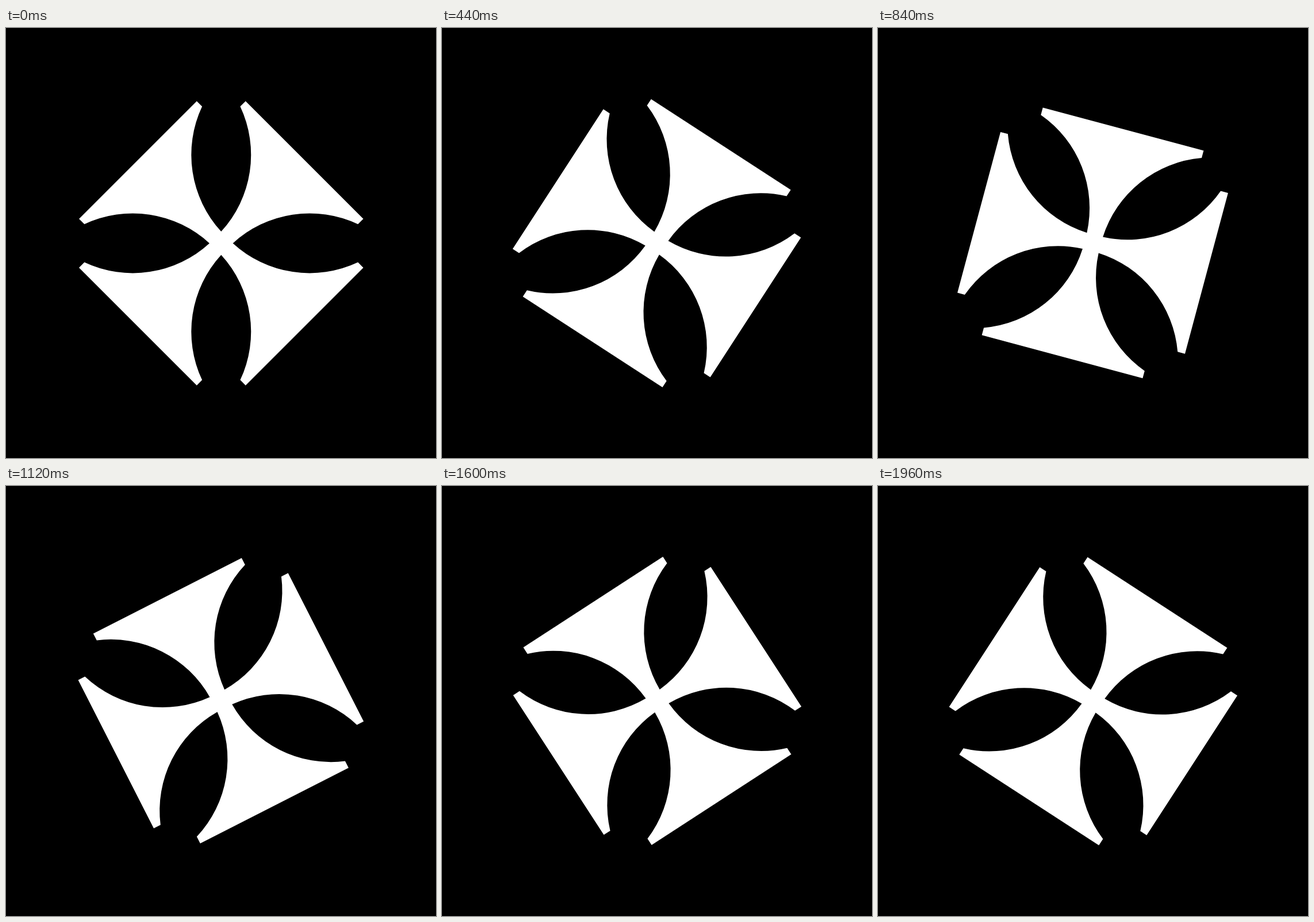
These frames come from a looping animation (748 px wide and 748 px high, 2000 ms). An HTML page with a canvas:

```html
<!DOCTYPE html>
<html lang="en">
<head>
<meta charset="utf-8">
<title>Spinning cross</title>
<style>
  html, body { margin: 0; width: 100%; height: 100%; overflow: hidden; background: #000; }
  canvas { display: block; }
</style>
</head>
<body>
<canvas id="stage" width="748" height="748"></canvas>
<script>
const SIZE = 748, LOOP = 2000, FRAME = 40;
const NECK = 14.4;    // half width where the arms meet
const HALF = 144.8;   // half length of an outer edge
const REACH = 204.9;  // centre to outer edge
const CAP = 13.2;     // height of the blunt tips
const BOW = 197.5;    // radius of the hollow sides

const ctx = document.getElementById('stage').getContext('2d');
const cross = makeCross();

function makeCross() {
  let d = `M${-NECK} ${-NECK}`;
  for (let i = 0; i < 4; i++) {
    const c = [1, 0, -1, 0][i], s = [0, 1, 0, -1][i];
    const at = (x, y) => `${x * c - y * s} ${x * s + y * c}`;
    const hollow = (x, y) => `A${BOW} ${BOW} 0 0 0 ${at(x, y)}`;
    d += hollow(-HALF, CAP - REACH)
       + `L${at(-HALF, -REACH)}`
       + `L${at(HALF, -REACH)}`
       + `L${at(HALF, CAP - REACH)}`
       + hollow(NECK, -NECK);
  }
  return new Path2D(d + 'Z');
}

// One turn is 60 steps of 6 degrees, shown at 25 frames a second.
function angleAt(time) {
  const frame = Math.floor((time % LOOP) / FRAME);
  const step = Math.max(0, Math.ceil(frame * 6 / 5) - 1);
  return (45 + step * 6) * Math.PI / 180;
}

function draw(time) {
  ctx.setTransform(1, 0, 0, 1, 0, 0);
  ctx.fillStyle = '#000';
  ctx.fillRect(0, 0, SIZE, SIZE);
  ctx.translate(SIZE / 2, SIZE / 2);
  ctx.rotate(angleAt(time));
  ctx.translate(0.5, 0.1); // the pivot sits slightly off centre
  ctx.fillStyle = '#fff';
  ctx.fill(cross);
}

function tick(now) {
  draw(Math.max(0, now));
  requestAnimationFrame(tick);
}

draw(0);
requestAnimationFrame(tick);
</script>
</body>
</html>
```
